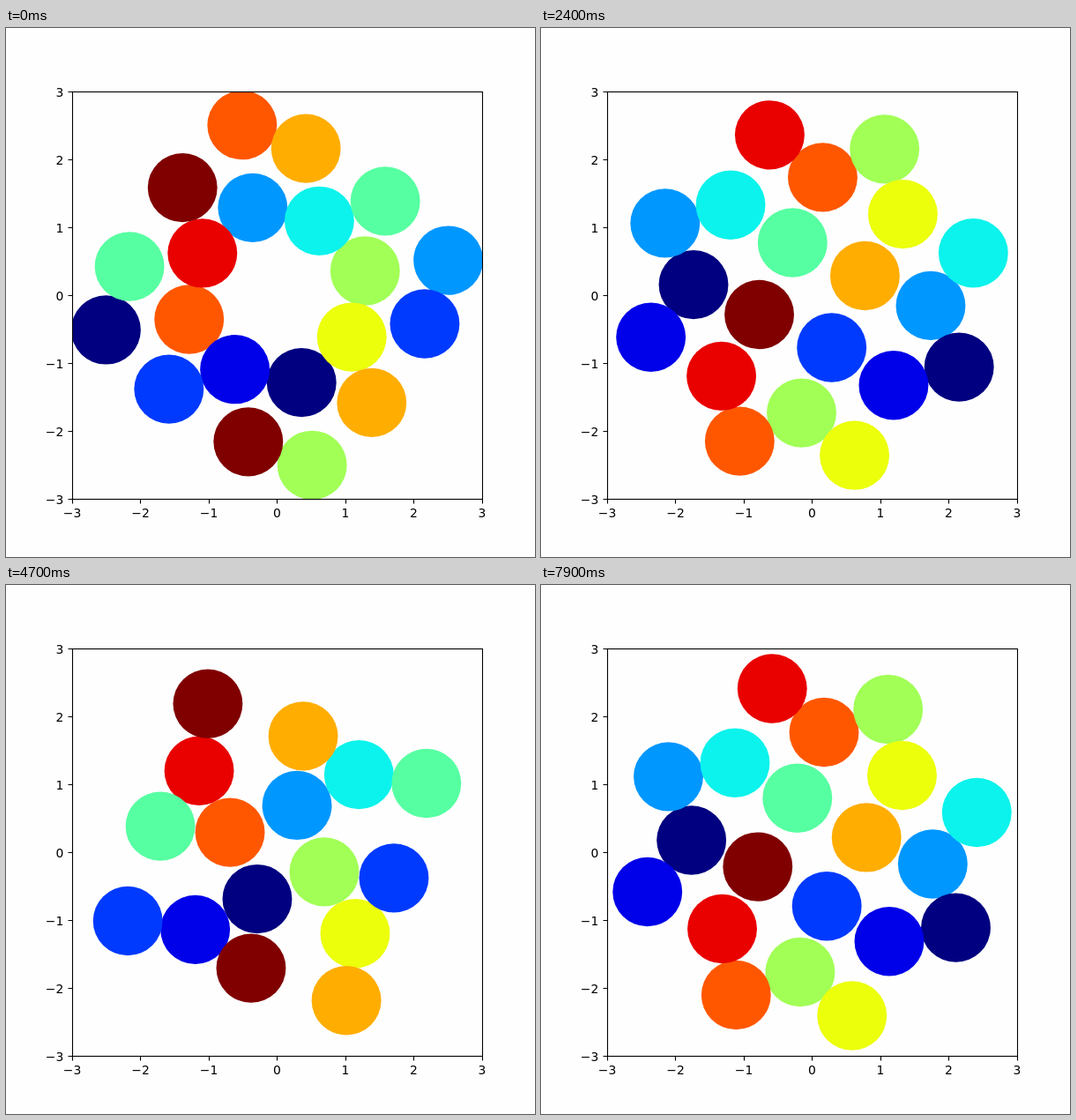
Write an HTML page that moves like this. It is 600 by 600 pixels and loops after 8 s.

```html
<!DOCTYPE html>
<html>
<head>
<meta charset="utf-8">
<style>
html, body { margin: 0; width: 100%; height: 100%; overflow: hidden; background: #fefefe; }
svg { display: block; width: 600px; height: 600px; }
text { font: 13.89px "DejaVu Sans", sans-serif; fill: #000; }
.line { fill: none; stroke: #000; stroke-width: 1.1; }
</style>
</head>
<body>
<svg viewBox="0 0 600 600">
  <clipPath id="box"><rect x="75" y="72" width="466" height="462.5"/></clipPath>
  <g id="discs" clip-path="url(#box)"></g>
  <rect class="line" x="75.5" y="72.5" width="465" height="462"/>
  <g id="axes"></g>
</svg>
<script>
const LOOP = 8000, STEP = 100, PERIOD = 5600, GAP = 0.995;
const ENTRY = [2.5, .5], EXIT = [-2.5, .5];

// Three kinds of disc cross from right to left, passing their via points
// at equal intervals; quarter turns give the other three streams.
const kinds = [
  { start: 650, time: 8310, wait: 950,
    via: [[1.87, -.17], [1.33, .18], [.21, .74], [-.74, 1.53], [-1.91, 1.26]] },
  { start: 2100, time: 8100, wait: 0,
    via: [[1.86, 1.01], [1.15, 1.15], [.17, 1.05], [-.87, 1.27], [-1.74, 1.28]] },
  { start: 3850, time: 8000, wait: 0,
    via: [[1.9, 1.25], [.78, 1.46], [-.18, .81], [-1.1, .68], [-1.81, .37]] }
];
for (const kind of kinds) kind.path = [ENTRY, ...kind.via, EXIT];
const turnColor = [3, 6, 0, 9];

const toX = x => 307.5 + 77.5 * x;
const toY = y => 303 - 77 * y;
const clamp = v => Math.min(1, Math.max(0, v));

// Rainbow from dark blue to dark red, v in 0..1.
function jet(v) {
  const red = Math.min(clamp((v - .35) / .31), 1 - clamp((v - .89) / .11) / 2);
  const green = Math.min(clamp((v - .125) / .25), clamp((.91 - v) / .27));
  const blue = Math.min(.5 + clamp(v / .11) / 2, clamp((.65 - v) / .31));
  return `rgb(${[red, green, blue].map(c => Math.round(255 * c))})`;
}

function add(parent, tag, attrs, text) {
  const el = document.createElementNS('http://www.w3.org/2000/svg', tag);
  for (const key in attrs) el.setAttribute(key, attrs[key]);
  if (text) el.textContent = text;
  return parent.appendChild(el);
}

const axes = document.getElementById('axes');
for (let v = -3; v <= 3; v++) {
  const label = v < 0 ? '\u2212' + -v : String(v);
  const x = Math.floor(toX(v)) + .5, y = Math.floor(toY(v)) + .5;
  add(axes, 'path', { class: 'line', d: `M${x} 534.5v5M75.5 ${y}h-5` });
  add(axes, 'text', { x: toX(v), y: 555, 'text-anchor': 'middle' }, label);
  add(axes, 'text', { x: 65.3, y: y + 5.5, 'text-anchor': 'end' }, label);
}

const layer = document.getElementById('discs');
const pool = Array.from({ length: 32 }, () => add(layer, 'ellipse', { rx: 39.45, ry: 39.2 }));

// Smooth curve through evenly timed points, s in 0..1.
function along(path, s) {
  const last = path.length - 1, i = Math.min(Math.floor(s * last), last - 1);
  const u = s * last - i, r = 1 - u;
  const slope = (j, k) => {
    const from = Math.max(j - 1, 0), to = Math.min(j + 1, last);
    return (path[to][k] - path[from][k]) / (to - from);
  };
  return [0, 1].map(k =>
    r * r * (1 + 2 * u) * path[i][k] + u * u * (3 - 2 * u) * path[i + 1][k] +
    u * r * (r * slope(i, k) - u * slope(i + 1, k)));
}

// Push overlapping discs apart.
function separate(discs) {
  for (let n = 0; n < 16; n++) {
    for (const d of discs) d.dx = d.dy = 0;
    discs.forEach((a, i) => discs.slice(i + 1).forEach(b => {
      const x = b.x - a.x, y = b.y - a.y, dist = Math.hypot(x, y);
      if (dist >= GAP || dist === 0) return;
      const push = (GAP - dist) / dist * .4;
      a.dx -= x * push; a.dy -= y * push;
      b.dx += x * push; b.dy += y * push;
    }));
    for (const d of discs) { d.x += d.dx; d.y += d.dy; }
  }
}

function discsAt(t) {
  const discs = [];
  kinds.forEach(({ start, time, wait, path }, n) => {
    for (let lap = -1; lap < 3; lap++) {
      const age = t % PERIOD + lap * PERIOD - start;
      if (age < -wait || age >= time) continue;
      let [x, y] = along(path, clamp(age / time));
      for (const c of turnColor) {
        discs.push({ x, y, fill: jet((c + n) / 11) });
        [x, y] = [y, -x];
      }
    }
  });
  separate(discs);
  return discs;
}

let shown = -1;
function frame() {
  const t = Math.floor(performance.now() % LOOP / STEP) * STEP;
  if (t !== shown) {
    shown = t;
    const discs = discsAt(t);
    pool.forEach((el, i) => {
      const d = discs[i];
      el.style.display = d ? '' : 'none';
      if (!d) return;
      el.setAttribute('cx', toX(d.x).toFixed(2));
      el.setAttribute('cy', toY(d.y).toFixed(2));
      el.setAttribute('fill', d.fill);
    });
  }
  requestAnimationFrame(frame);
}
frame();
</script>
</body>
</html>
```
